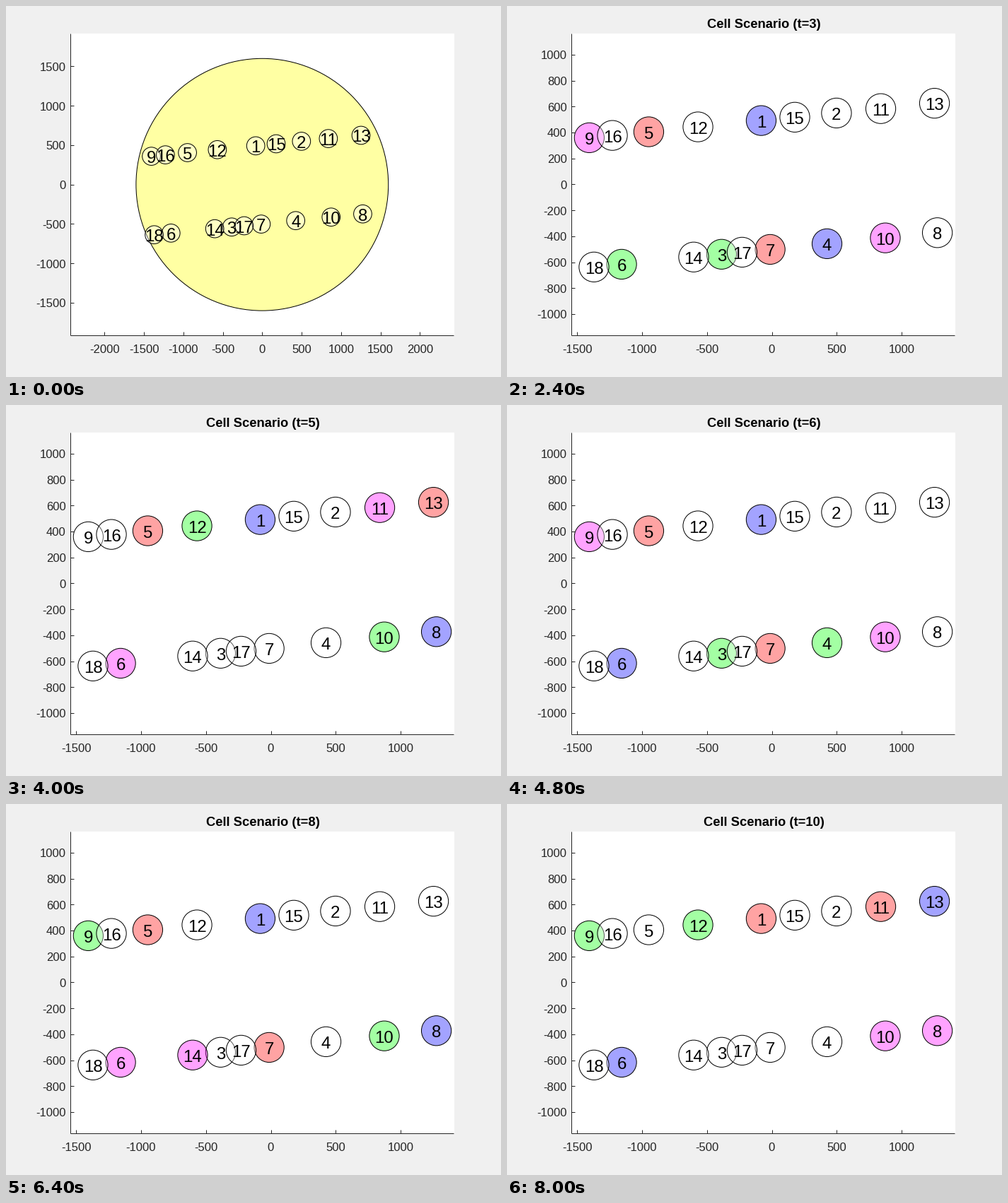
A matplotlib script for the animation above (8800 ms loop, 700 px wide and 525 px high).

```python
import matplotlib.pyplot as plt
from matplotlib.animation import FuncAnimation
from matplotlib.patches import Circle, Rectangle

W, H, DPI = 700, 525, 100
PX = 72 / DPI
LEFT, RIGHT, TOP, BOTTOM = 91, 634, 39, 466
INK = (38 / 255,) * 3
ALPHA = 0.36
RADIUS = 115
COLORS = {"r": (1, 0, 0), "g": (0, 1, 0), "b": (0, 0, 1),
          "m": (1, 0, 1), "w": (1, 1, 1), "y": (1, 1, 0)}

# Cells lie on two parallel lines: y = +-500 + 0.1 x
UPPER = {9: -1406, 16: -1228, 5: -948, 12: -569, 1: -82,
         15: 177, 2: 498, 11: 839, 13: 1253}
LOWER = {18: -1370, 6: -1157, 14: -602, 3: -387, 17: -229,
         7: -13, 4: 425, 10: 874, 8: 1275}
CELLS = {n: (x, 500 + 0.1 * x) for n, x in UPPER.items()}
CELLS.update({n: (x, -500 + 0.1 * x) for n, x in LOWER.items()})

# Active cells per time step, grouped by channel colour
STEPS = [
    dict(r=(5, 6), g=(9, 4), b=(1, 2, 7), m=(3,)),
    dict(r=(5, 7), g=(3, 4), b=(1, 9), m=(6,)),
    dict(r=(5, 7), g=(6, 3), b=(1, 4), m=(9, 10)),
    dict(r=(5, 7), g=(9, 10), b=(1, 4), m=(6, 14)),
    dict(r=(5, 13), g=(12, 10), b=(1, 8), m=(11, 6)),
    dict(r=(5, 7), g=(3, 4), b=(1, 6), m=(9, 10)),
    dict(r=(9, 15), g=(3, 10), b=(1, 7), m=(6, 4)),
    dict(r=(5, 7), g=(9, 10), b=(1, 8), m=(6, 14)),
    dict(r=(9, 5), g=(2, 8), b=(3, 4), m=(14, 7)),
    dict(r=(1, 11), g=(9, 12), b=(13, 6), m=(10, 8)),
]


class View:
    """Maps data units to stage pixels."""

    def __init__(self, x0, y0, scale, xticks, yticks):
        self.x0, self.y0, self.scale = x0, y0, scale
        self.xticks, self.yticks = xticks, yticks

    def x(self, v):
        return self.x0 + v * self.scale

    def y(self, v):
        return self.y0 - v * self.scale


WIDE = View(362.3, 252.7, 0.1115,
            range(-2000, 2001, 500), range(-1500, 1501, 500))
CLOSE = View(374.5, 252.4, 0.1836,
             range(-1500, 1001, 500), range(-1000, 1001, 200))

plt.rcParams["font.family"] = "Liberation Sans"
fig = plt.figure(figsize=(W / DPI, H / DPI), dpi=DPI, facecolor="#f0f0f0")
ax = fig.add_axes([0, 0, 1, 1])


def label(x, y, text, size, color="black", ha="center", weight="normal"):
    ax.text(x, y, text, fontsize=size * PX, color=color, ha=ha,
            va="baseline", weight=weight, zorder=5)


def line(xs, ys):
    ax.plot(xs, ys, color=INK, lw=PX, solid_capstyle="butt", zorder=4)


def disc(view, x, y, radius, key):
    ax.add_patch(Circle((view.x(x), view.y(y)), radius * view.scale,
                        fc=COLORS[key] + (ALPHA,), ec="black", lw=PX, zorder=2))


def draw_axes(view):
    ax.add_patch(Rectangle((LEFT, TOP), RIGHT - LEFT, BOTTOM + 1 - TOP,
                           fc="white", ec="none", lw=0, zorder=1))
    line([LEFT, LEFT], [TOP, BOTTOM])
    line([LEFT, RIGHT - 1], [BOTTOM, BOTTOM])
    for v in view.xticks:
        x = view.x(v)
        line([x, x], [BOTTOM, BOTTOM - 5])
        label(x, 491, str(v), 16.67, INK)
    for v in view.yticks:
        y = view.y(v)
        line([LEFT, LEFT + 5], [y, y])
        label(84.5, y + 6.5, str(v), 16.67, INK, ha="right")


def draw(frame):
    ax.clear()
    ax.set(xlim=(0, W), ylim=(H, 0))
    ax.axis("off")
    view = CLOSE if frame else WIDE
    draw_axes(view)
    active = {}
    if frame:
        for key, cells in STEPS[frame - 1].items():
            active.update(dict.fromkeys(cells, key))
        label(363, 31, f"Cell Scenario (t={frame})", 18.33, weight="bold")
    else:
        disc(view, 0, 0, 1600, "y")
    for n in sorted(CELLS):
        x, y = CELLS[n]
        disc(view, x, y, RADIUS, active.get(n, "w"))
        label(view.x(x), view.y(y) + 9.5, str(n), 24)
    return []


anim = FuncAnimation(fig, draw, frames=len(STEPS) + 1, interval=800,
                     init_func=lambda: [], repeat=True, repeat_delay=0)
plt.show()
```
